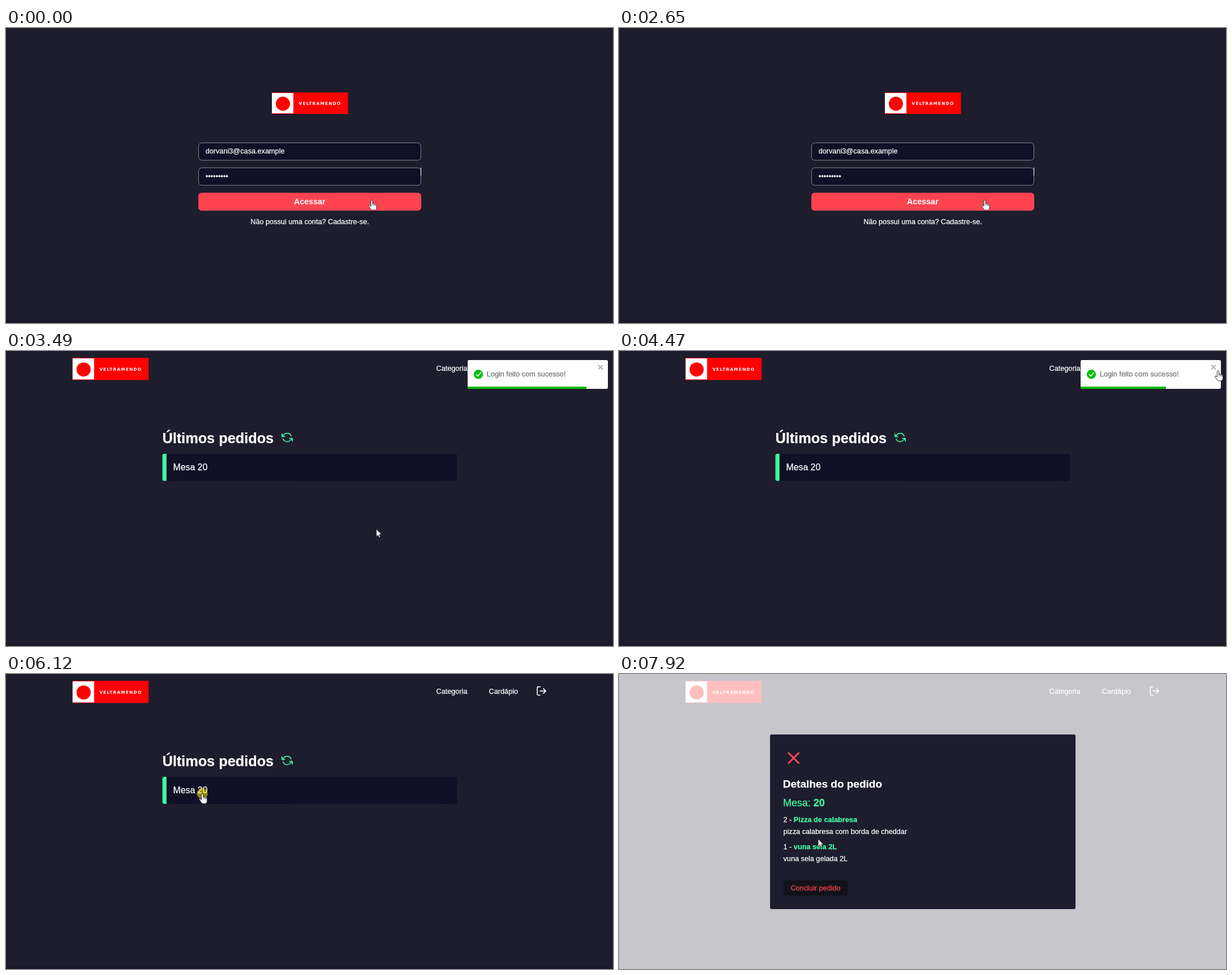
An HTML page for the animation above (7990 ms loop, 1073 by 522 pixels).

```html
<!DOCTYPE html>
<html lang="pt-BR">
<head>
<meta charset="utf-8">
<style>
  html, body { margin: 0; width: 100%; height: 100%; overflow: hidden; background: #1d1d2e; }
  svg { display: block; }
  text { font: 12.7px "Liberation Sans", Arial, sans-serif; color: #fff; white-space: pre; }
  text, tspan { fill: currentColor; stroke: currentColor; stroke-width: .25; }
  .b { font-weight: 700; }
  .green { fill: #3fffa3; color: #3fffa3; }
  .red { fill: #ff4450; color: #ff4450; }
  .field { fill: #101026; stroke: #8a8a8a; }
  .icon { fill: none; stroke: #fff; stroke-width: 2; stroke-linecap: round; stroke-linejoin: round; }
  .brand { font: 700 7.4px "DejaVu Sans", sans-serif; letter-spacing: 1.2px; stroke: none; }
  .status { font: 9px "Open Sans", sans-serif; color: #44444a; stroke: none; }
  .pointer { fill: #fff; stroke: #15151c; stroke-width: .9; stroke-linejoin: round; }
</style>
</head>
<body>
<svg id="stage" width="1073" height="522" viewBox="0 0 1073 522"></svg>
<script>
const LOOP = 7990;
const HOME = 2800, MODAL = 6190;

const logo = (x, y, h) => `<g transform="translate(${x} ${y})">
  <rect width="134.5" height="${h}" fill="#f00"/>
  <rect y="1" width="38" height="${h - 2}" fill="#fff"/>
  <circle cx="19.5" cy="${h / 2 + 1}" r="12.5" fill="#f00"/>
  <text class="brand" x="47.5" y="${h / 2 + 3}">VELTRAMENDO</text></g>`;

const line = (y, count, name) =>
  `<text x="290.5" y="${y}">${count} - <tspan class="green b">${name}</tspan></text>`;

stage.innerHTML = `
<rect width="1073" height="522" fill="#1d1d2e"/>
<rect y="518" width="1073" height="4" fill="#191927"/>

<g id="login">
  ${logo(470, 114, 38)}
  <rect class="field" x="340.4" y="203.2" width="393" height="30.8" rx="6"/>
  <rect class="field" x="340.4" y="247.4" width="393" height="30.9" rx="6"/>
  <text x="352.7" y="222">dorvani3@casa.example</text>
  <text x="352.7" y="266.6">•••••••••</text>
  <rect id="caret" x="733" y="247" width="1" height="14" fill="#fff"/>
  <rect x="340" y="291.6" width="394" height="31.7" rx="6" class="red"/>
  <text class="b" x="536.8" y="312.2" text-anchor="middle" style="font-size:14.3px;stroke:none">Acessar</text>
  <text x="537" y="347" text-anchor="middle">Não possui uma conta? Cadastre-se.</text>
</g>

<g id="home">
  ${logo(117.7, 12, 39.3)}
  <text x="760.5" y="35.4">Categoria</text>
  <text x="853.6" y="35.4">Cardápio</text>
  <path class="icon" transform="translate(936.7 20.1) scale(.83)"
    d="M9 21H5a2 2 0 0 1-2-2V5a2 2 0 0 1 2-2h4M16 17l5-5-5-5M21 12H9"/>
  <text class="b" x="276.4" y="162.6" style="font-size:25.3px">Últimos pedidos</text>
  <path class="icon" transform="translate(487 143) scale(.83)" style="stroke:#3fffa3"
    d="M1 4v6h6M23 20v-6h-6M20.49 9A9 9 0 0 0 5.64 5.64L1 10m22 4l-4.64 4.36A9 9 0 0 1 3.51 15"/>
  <rect x="276.5" y="182" width="521" height="47.7" rx="3.5" fill="#101026"/>
  <path class="green" d="M283.7 182h-4a3.2 3.2 0 0 0-3.2 3.2v41.3a3.2 3.2 0 0 0 3.2 3.2h4z"/>
  <text x="295.6" y="210.8" style="font-size:15.8px">Mesa 20</text>
</g>

<g id="status">
  <path d="M0 505h351.5q2.5 0 2.5 2.5V522H0z" fill="#b7b7bf"/>
  <text class="status" x="-1" y="517">Aguardando servidor...</text>
</g>

<g id="modal">
  <rect width="1073" height="522" fill="#fff" opacity=".75"/>
  <rect x="267" y="107" width="540" height="309" rx="3" fill="#1d1d2e"/>
  <path class="icon" transform="translate(308.7 148.7) scale(1.48)" style="stroke:#ff4450"
    d="M6-6L-6 6M-6-6L6 6"/>
  <text class="b" x="289.8" y="200.5" style="font-size:19px">Detalhes do pedido</text>
  <text class="green" x="290" y="234" style="font-size:17.9px">Mesa: <tspan class="b">20</tspan></text>
  ${line(262.3, 2, 'Pizza de calabresa')}
  <text x="290.5" y="283">pizza calabresa com borda de cheddar</text>
  ${line(310, 1, 'vuna sela 2L')}
  <text x="290.5" y="331">vuna sela gelada 2L</text>
  <rect x="291" y="365.3" width="113.5" height="27" rx="3" fill="#121219"/>
  <text class="red" x="303.4" y="383">Concluir pedido</text>
</g>

<g id="toast">
  <clipPath id="card"><rect x="816" y="16" width="248" height="51" rx="3"/></clipPath>
  <g clip-path="url(#card)">
    <rect x="816" y="16" width="248" height="51" fill="#fff"/>
    <rect id="bar" x="816" y="63" width="248" height="4" fill="#07bc0c"/>
  </g>
  <circle cx="835" cy="41.2" r="8.1" fill="#07bc0c"/>
  <path class="icon" d="M831.2 41.5l2.8 2.9 5.2-6" style="stroke-width:1.5"/>
  <text x="849.8" y="45.4" style="color:#757575">Login feito com sucesso!</text>
  <path class="icon" d="M1047.3 25.2l7 7m0-7l-7 7" style="stroke:#aaa;stroke-width:1.7"/>
</g>

<g id="cursor">
  <circle id="click" r="9.7" fill="#fff000" opacity=".52"/>
  <g id="hand" class="pointer">
    <path d="M-1.6 1.6a1.6 1.6 0 0 1 3.2 0v4.6l1-.3a1.4 1.4 0 0 1 2 .8 1.4 1.4 0 0 1 2 .8 1.3 1.3 0 0 1 2 1.2v4c0 3-1.5 5-3.5 5.2H1c-1.5 0-2.5-1.5-3.5-3l-3-4.2c-.6-1.2 1-2.2 2.2-1.2l1.7 1.6z"/>
    <path d="M1.8 6.5v3M4.4 7.3v2.6M6.6 8v2.2"/>
  </g>
  <path id="arrow" class="pointer" transform="scale(.85)"
    d="M0 0V15.5L3.5 12.2 5.9 17.6 8.4 16.5 6.1 11.2H10.8Z"/>
</g>`;

const move = (time, x, y = 0, easing = 'ease-in-out', opacity = 1) =>
  ({ offset: time / LOOP, transform: `translate(${x}px, ${y}px)`, easing, opacity });

const animate = (el, keys) => {
  const animation = el.animate(keys, { duration: LOOP, fill: 'both' });
  animation.pause();
  return animation;
};

const bounce = 'cubic-bezier(.215,.61,.355,1)';
const animations = [
  animate(toast, [
    move(0, 2370), move(2485, 2370, 0, bounce),
    move(2905, -20, 0, bounce), move(3010, 8, 0, bounce),
    move(3115, -4, 0, bounce), move(3185, 0),
    move(4750, 0, 0, 'ease'), move(4890, -16, 0, 'ease'),
    move(5450, 1580, 0, 'linear', 0), move(LOOP, 1580, 0, 'linear', 0)
  ]),
  animate(cursor, [
    [0, 646.5, 304.5], [3240, 646.5, 304.5], [3420, 645, 322], [4060, 1040, 42],
    [4330, 1059, 35], [4900, 1059, 35], [5680, 362, 234], [5960, 347, 211.5],
    [6320, 347, 211.5], [6560, 345, 249], [6750, 400, 258], [7120, 297, 264],
    [7280, 297, 264], [7550, 335, 246], [7890, 352, 292], [LOOP, 352, 292]
  ].map(key => move(...key)))
];

const statusBar = document.getElementById('status');
const within = (t, ...spans) => spans.some(([from, to]) => t >= from && t < to);
const show = (el, on) => { el.style.display = on ? '' : 'none'; };

function draw(now) {
  const t = now % LOOP;
  animations.forEach(animation => { animation.currentTime = t; });

  show(login, t < HOME);
  show(home, t >= HOME);
  show(modal, t >= MODAL);
  show(statusBar, within(t, [HOME, 3210]));
  show(caret, t < 2310 ? Math.floor((t + 10) / 530) % 2 === 0 : t >= 2450);

  // The countdown pauses while the pointer rests on the toast.
  const left = 1 - Math.min(Math.max(t - 3185, 0) / 2000, .391);
  bar.setAttribute('width', 248 * left);

  const pointing = within(t, [0, HOME], [3950, 4950], [5420, MODAL]);
  show(hand, pointing);
  show(arrow, !pointing);
  show(click, within(t, [2310, 2450], [4680, 4820], [6050, MODAL]));
  requestAnimationFrame(draw);
}

draw(0);
</script>
</body>
</html>
```
